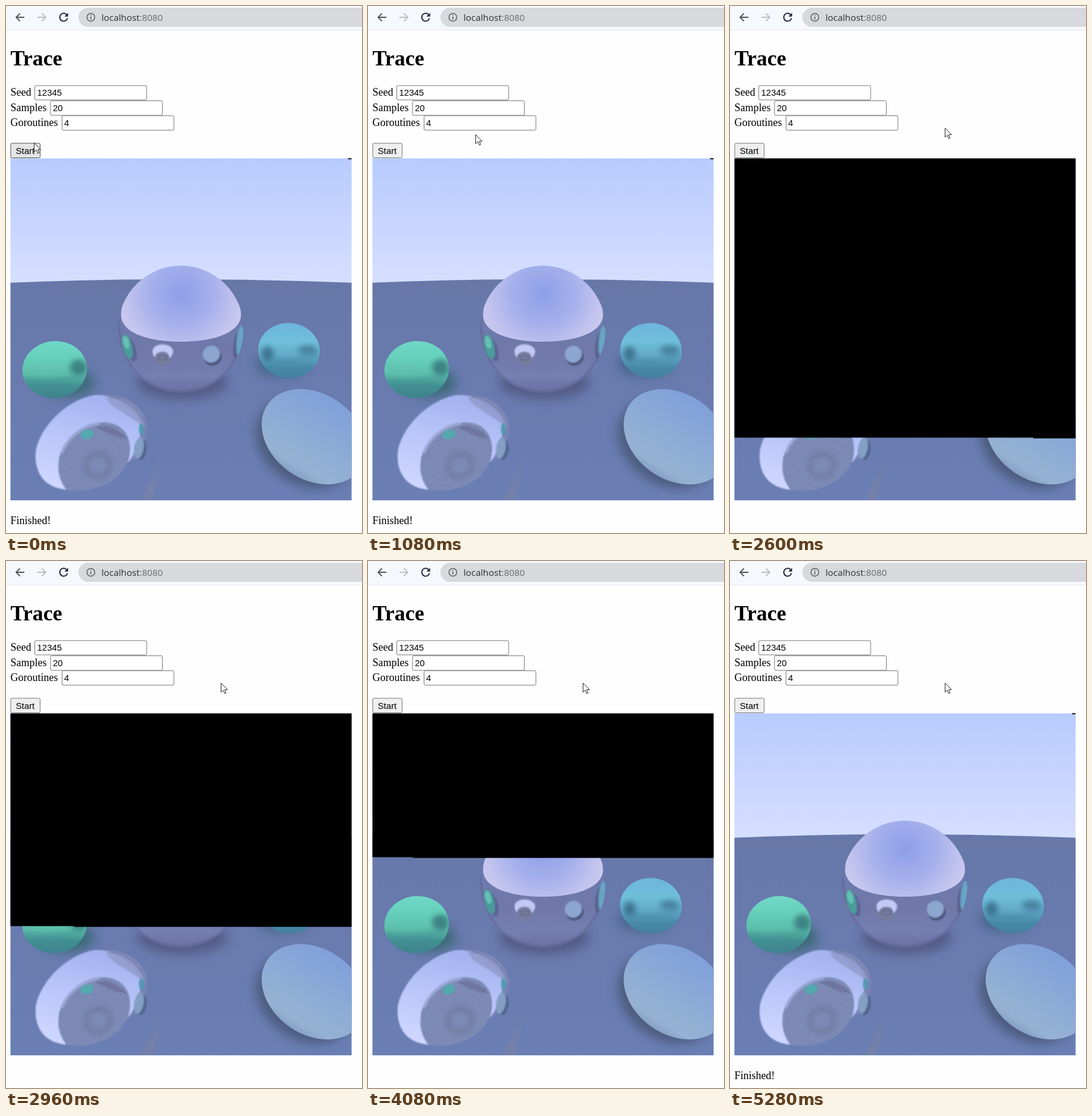
Write an HTML page that moves like this. It is 600 by 887 pixels and loops after 5320 ms.

```html
<!DOCTYPE html>
<html lang="en">
<head>
<meta charset="utf-8">
<title>Trace</title>
<style>
html, body { margin: 0; width: 100%; height: 100%; overflow: hidden; background: #fefeff; }
svg { display: block; width: 100%; height: 100%; }
.page { font: 18px "Liberation Serif", serif; }
.control { font: 15px "Liberation Sans", sans-serif; }
.address { font: 15.3px "Open Sans", sans-serif; }
.box rect { fill: #fff; stroke: #767676; }
</style>
</head>
<body>
<svg viewBox="0 0 600 887" xmlns="http://www.w3.org/2000/svg">
  <defs>
    <linearGradient id="sky" x2="0" y2="1"><stop stop-color="#b7cbfe"/><stop offset="1" stop-color="#d6dfff"/></linearGradient>
    <linearGradient id="ground" x2="0" y2="1"><stop stop-color="#6677a8"/><stop offset=".4" stop-color="#697aae"/><stop offset="1" stop-color="#6a7fb5"/></linearGradient>
    <linearGradient id="mirror" x2="0" y2="1"><stop offset=".3" stop-color="#6c7bb0"/><stop offset=".6" stop-color="#7078a8"/><stop offset=".82" stop-color="#747fb2"/><stop offset="1" stop-color="#656a98"/></linearGradient>
    <radialGradient id="dome" gradientUnits="userSpaceOnUse" cx="295" cy="466" r="118" gradientTransform="translate(0 18)"><stop stop-color="#8d9fe8"/><stop offset=".45" stop-color="#a5b0ec"/><stop offset=".8" stop-color="#c3c4ee"/><stop offset="1" stop-color="#d0ccee"/></radialGradient>
    <linearGradient id="green" x2="0" y2="1"><stop stop-color="#72d8c8"/><stop offset=".3" stop-color="#66d0ba"/><stop offset=".58" stop-color="#5cbcaa"/><stop offset=".76" stop-color="#418f92"/><stop offset="1" stop-color="#3f7f8d"/></linearGradient>
    <linearGradient id="teal" x2="0" y2="1"><stop stop-color="#6eb3de"/><stop offset=".35" stop-color="#6fbfda"/><stop offset=".62" stop-color="#5fa6c5"/><stop offset=".78" stop-color="#4789a8"/><stop offset="1" stop-color="#467d9f"/></linearGradient>
    <linearGradient id="matte" gradientUnits="userSpaceOnUse" x1="515" y1="648" x2="525" y2="804"><stop stop-color="#7f9fda"/><stop offset=".5" stop-color="#8dabd6"/><stop offset=".85" stop-color="#96b2d2"/><stop offset="1" stop-color="#8099be"/></linearGradient>
    <linearGradient id="shell" gradientUnits="userSpaceOnUse" x1="130" y1="660" x2="95" y2="815"><stop stop-color="#a5b4f0"/><stop offset=".4" stop-color="#b8c5fa"/><stop offset="1" stop-color="#d0d8ff"/></linearGradient>
    <filter id="blur1" x="-50%" y="-50%" width="200%" height="200%"><feGaussianBlur stdDeviation="1"/></filter>
    <filter id="blur4" x="-50%" y="-50%" width="200%" height="200%"><feGaussianBlur stdDeviation="4"/></filter>
    <filter id="blur9" x="-60%" y="-60%" width="220%" height="220%"><feGaussianBlur stdDeviation="9"/></filter>
    <filter id="grain" x="0" y="0" width="100%" height="100%">
      <feTurbulence type="fractalNoise" baseFrequency=".55" numOctaves="2" seed="5"/>
      <feColorMatrix values="0 0 0 0 .4  0 0 0 0 .42  0 0 0 0 .55  2.4 0 0 0 -.95"/>
      <feComposite operator="in" in2="SourceGraphic"/>
    </filter>
    <clipPath id="frame"><rect x="7.5" y="256.5" width="575" height="575.5"/></clipPath>
    <clipPath id="sphereClip"><ellipse cx="294.7" cy="544" rx="106" ry="107"/></clipPath>
    <clipPath id="greenClip"><ellipse cx="82" cy="612" rx="54.5" ry="48" transform="rotate(-7 82 612)"/></clipPath>
    <clipPath id="tealClip"><ellipse cx="477" cy="580" rx="52" ry="46.5" transform="rotate(6 477 580)"/></clipPath>
  </defs>

  <rect width="600" height="887" fill="#fefeff"/>
  <rect width="600" height="40" fill="#f5f9fe"/>
  <path d="M0 40.5H600" stroke="#e4e7ec"/>
  <rect x="122" y="3" width="520" height="32" rx="16" fill="#d7d9dd"/>
  <g fill="none" stroke-width="1.8">
    <path id="arrow" d="M31 19H17.5M23.5 12.5L17 19L23.5 25.5" stroke="#505358"/>
    <path d="M53 19H66.500M60.500 12.500L67 19L60.500 25.500" stroke="#bbbec3"/>
    <path d="M102.500 15A6.600 6.600 0 1 0 103.600 20.500" stroke="#25283f" stroke-width="2"/>
    <path d="M104.700 11.500V17.700H98.500Z" fill="#25283f"/>
    <circle cx="143" cy="19" r="6.600" stroke="#5b5e63" stroke-width="1.500"/>
    <path d="M143 18V22.500M143 15.200V16.800" stroke="#5b5e63" stroke-width="1.600"/>
  </g>
  <text class="address" x="161" y="25" fill="#2b2d31">localhost<tspan fill="#66696e">:8080</tspan></text>

  <g class="page">
    <text x="7.500" y="100" font-size="36" font-weight="bold">Trace</text>
    <text x="7.500" y="151">Seed</text>
    <text x="7.500" y="176.500">Samples</text>
    <text x="7.500" y="202">Goroutines</text>
    <text id="status" x="7.500" y="872">Finished!</text>
  </g>
  <g class="control box">
    <rect x="48.500" y="134" width="188.500" height="24" rx="2"/><text x="52.500" y="151">12345</text>
    <rect x="75" y="159.500" width="188.500" height="24.500" rx="2"/><text x="79" y="176.500">20</text>
    <rect x="94.500" y="184.700" width="188.500" height="24.300" rx="2"/><text x="98" y="202">4</text>
    <rect id="button" x="8" y="231" width="49.500" height="24.500" rx="2"/><text x="16.500" y="248.500">Start</text>
  </g>

  <g clip-path="url(#frame)">
    <rect x="7" y="256" width="576" height="212" fill="url(#sky)"/>
    <path d="M0 466Q295 454 590 466V840H0Z" fill="url(#ground)"/>

    <!-- contact shadows -->
    <ellipse cx="297" cy="634" rx="76" ry="28" fill="#50567f" opacity=".85" filter="url(#blur9)"/>
    <ellipse cx="105" cy="634" rx="44" ry="24" fill="#35676f" opacity=".85" filter="url(#blur9)"/>
    <ellipse cx="465" cy="603" rx="44" ry="21" fill="#3c6383" opacity=".85" filter="url(#blur9)"/>
    <ellipse cx="502" cy="738" rx="88" ry="66" transform="rotate(35 502 738)" fill="#465675" opacity=".85" filter="url(#blur9)"/>
    <path d="M259 742Q258 790 226 832H246Q257 790 259 742Z" fill="#92888f" opacity=".38" filter="url(#blur4)"/>

    <!-- mirror sphere -->
    <g clip-path="url(#sphereClip)">
      <path d="M180 461Q295 457 410 461V660H180Z" fill="url(#mirror)"/>
      <path d="M189 520Q191 642 295 650Q400 640 401 520" fill="none" stroke="#565d8b" stroke-width="3" opacity=".55" filter="url(#blur1)"/>
      <path d="M194 520C194 474 240 437 295 437S396 474 396 520C396 548 353 565 295 565S194 549 194 520Z" fill="url(#dome)"/>
      <g filter="url(#blur1)">
        <ellipse cx="211" cy="579" rx="8" ry="20" transform="rotate(-15 211 579)" fill="#4e5784" opacity=".6"/>
        <ellipse cx="204.500" cy="573.500" rx="8" ry="21" transform="rotate(-14 204.500 573.500)" fill="#4a9c9b"/>
        <ellipse cx="202.500" cy="566" rx="5" ry="11" transform="rotate(-14 202.500 566)" fill="#65c1b5"/>
        <ellipse cx="389" cy="570" rx="6" ry="22" transform="rotate(8 389 570)" fill="#4d5780" opacity=".6"/>
        <ellipse cx="394.500" cy="563" rx="5.500" ry="25" transform="rotate(6 394.500 563)" fill="#67a5c5"/>
        <ellipse cx="264" cy="589" rx="15" ry="17" fill="#777c9f"/>
        <path d="M247 580C249 566 279 566 282 581C281 588 277 592 275 592C276 578 252 579 251 591C248 589 247 585 247 580Z" fill="#c1c9f5"/>
        <ellipse cx="264" cy="592" rx="8" ry="4" fill="none" stroke="#656986" stroke-width="2"/>
        <ellipse cx="349" cy="592" rx="15" ry="13" transform="rotate(-25 349 592)" fill="#4f5880"/>
        <ellipse cx="346" cy="586" rx="14.500" ry="14" transform="rotate(-35 346 586)" fill="#8da6cf"/>
      </g>
    </g>

    <!-- brushed metal spheres -->
    <g clip-path="url(#greenClip)">
      <rect x="26" y="562" width="114" height="102" fill="url(#green)"/>
      <ellipse cx="122" cy="608" rx="14" ry="13" fill="#2f6771" opacity=".7" filter="url(#blur4)"/>
      <path d="M27 628Q75 640 137 618" fill="none" stroke="#38868a" stroke-width="5" opacity=".45" filter="url(#blur4)"/>
    </g>
    <g clip-path="url(#tealClip)">
      <rect x="423" y="530" width="108" height="100" fill="url(#teal)"/>
      <ellipse cx="441" cy="585" rx="10" ry="12" fill="#315f7a" opacity=".7" filter="url(#blur4)"/>
      <ellipse cx="508" cy="579" rx="16" ry="8" fill="#376a86" opacity=".65" filter="url(#blur4)"/>
      <path d="M432 590Q478 608 526 585" fill="none" stroke="#39748e" stroke-width="5" opacity=".45" filter="url(#blur4)"/>
    </g>
    <ellipse cx="519" cy="725" rx="95" ry="72" transform="rotate(35 519 725)" fill="url(#matte)"/>

    <!-- glass sphere -->
    <path d="M165 655C205 651 240 680 238 711C236 748 220 765 205 768L170 720Z" fill="#7682b4" filter="url(#blur1)"/>
    <path d="M102 814C65 811 48 786 50 753C54 715 94 668 143 656C164 652 181 658 205 675C225 688 231 702 227 718C223 742 214 760 205 768L190 708L125 716L90 760Z" fill="url(#shell)" filter="url(#blur1)"/>
    <path d="M168 656C207 655 234 680 237 710C217 697 202 688 184 676Q169 665 168 656Z" fill="#929bcc" opacity=".85" filter="url(#blur1)"/>
    <path d="M175 657Q221 664 236 707" fill="none" stroke="#6d769f" stroke-width="3" opacity=".7" filter="url(#blur1)"/>
    <path id="bowl" d="M102 814C77 784 87 736 126 712C158 692 201 698 208 735Q211 752 205 768C190 803 145 822 102 814Z" fill="#7584b3" filter="url(#blur1)"/>
    <path d="M94 752C104 726 129 707 158 702" fill="none" stroke="#a9b6e7" stroke-width="5" opacity=".65" filter="url(#blur1)"/>
    <path d="M151 709Q176 700 205 728Q182 727 151 709Z" fill="#666d98" filter="url(#blur1)"/>
    <path d="M102 814C77 784 87 736 126 712C158 692 201 698 208 735Q211 752 205 768C190 803 145 822 102 814Z" filter="url(#grain)" opacity=".5"/>
    <ellipse cx="155" cy="773" rx="21" ry="19" transform="rotate(-30 155 773)" fill="none" stroke="#666c8d" stroke-width="7" opacity=".55" filter="url(#blur4)"/>
    <g filter="url(#blur1)">
      <ellipse cx="136.500" cy="721" rx="11" ry="8" transform="rotate(-15 136.500 721)" fill="#52a9ae"/>
      <ellipse cx="228" cy="712" rx="4" ry="10" fill="#529bb0"/>
      <ellipse cx="229" cy="747" rx="8" ry="17" transform="rotate(8 229 747)" fill="#53658d"/>
      <ellipse cx="224" cy="744" rx="8" ry="18" transform="rotate(10 224 744)" fill="#839fc3"/>
    </g>
  </g>
  <path id="cover"/>
  <path id="cursor" d="M.5 .5V15.800L4.100 12.400L6.700 18L9 17L6.500 11.600H11.400Z" fill="#fff" stroke="#222" stroke-linejoin="round"/>
</svg>
<script>
const LOOP = 5320;
const get = id => document.getElementById(id);
const button = get("button"), cover = get("cover"), cursor = get("cursor"), status_ = get("status");

// Time, then the scanline and column reached by the renderer.
const progress = [
  [0, 257.5, 576.5],
  [1520, 726.5, 511],
  [2720, 614.5, 115],
  [3860, 498.5, 75.5],
  [4960, 257.5, 576.5]
];
// Time, then the pointer position.
const path = [[0, 47, 230], [640, 47, 230], [1080, 181, 216], [1320, 285, 178], [1560, 360, 205], [1660, 360, 205], [1720, 362, 205]];

function pointer(t) {
  const next = path.findIndex(p => p[0] > t);
  if (next < 0) return path[path.length - 1].slice(1);
  const a = path[next - 1], b = path[next];
  const u = (t - a[0]) / (b[0] - a[0]);
  return [1, 2].map(i => Math.round(a[i] + (b[i] - a[i]) * u));
}

function draw(t) {
  const [, row, column] = progress.filter(p => p[0] <= t).pop();
  const done = row < 260;
  cover.setAttribute("d", done
    ? "M576.5 256.3H582.5V258H576.5Z"
    : `M7.5 256.5H582.5V${row + 1.2}H${column}V${row}H7.5Z`);
  status_.style.display = done ? "" : "none";

  const [x, y] = pointer(t);
  cursor.setAttribute("transform", `translate(${x} ${y})`);
  const hover = x < 58 && y > 228;
  button.style.fill = hover ? "#e5e5e5" : "#efefef";
  button.style.stroke = hover ? "#4f4f4f" : "#767676";
}

const start = performance.now();
function tick() {
  draw((performance.now() - start) % LOOP);
  requestAnimationFrame(tick);
}
tick();
</script>
</body>
</html>
```
